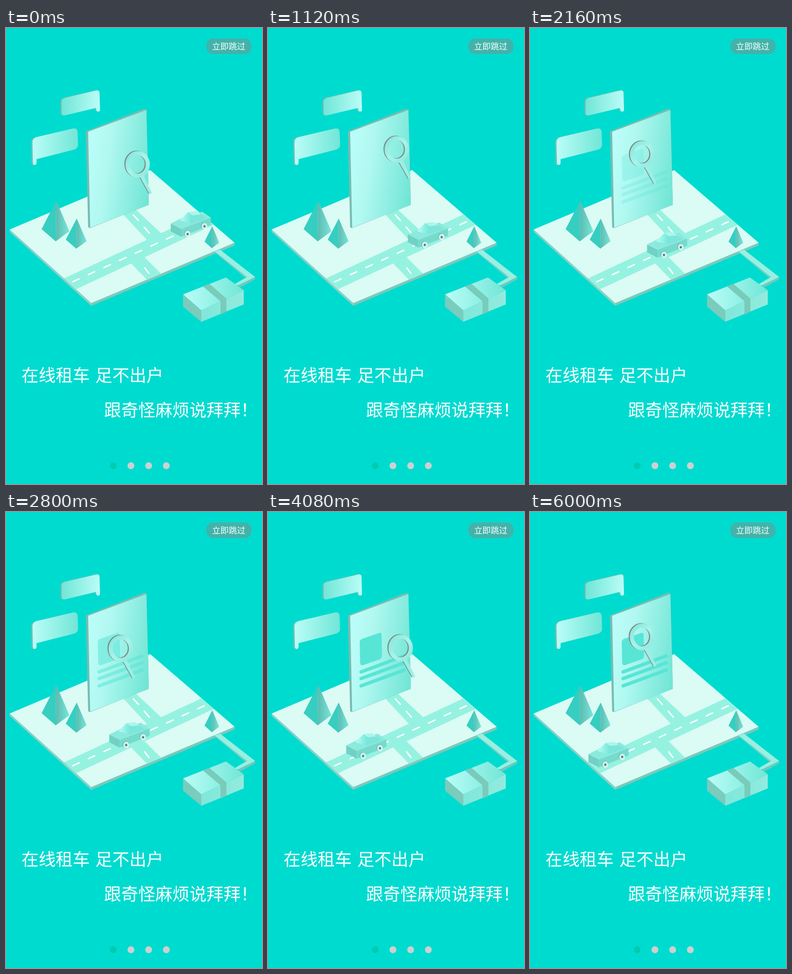
An HTML page for the animation above (6080 ms loop, 561x998 px).

```html
<!DOCTYPE html>
<html lang="zh-CN">
<head>
<meta charset="utf-8">
<title>在线租车</title>
<style>
  html, body { margin: 0; width: 100%; height: 100%; overflow: hidden; background: #00dbd0; }
  svg { display: block; width: 561px; height: 998px; }
  text { font-family: "Noto Sans CJK SC", "Noto Sans CJK", sans-serif; fill: #fff; }
  .title { font-size: 37.4px; font-weight: 300; }
  .road { fill: #96f2e0; }
  .dash { stroke: #fff; stroke-width: 3; stroke-linecap: round; }
  .edge { fill: #78bdb1; }
</style>
</head>
<body>
<svg viewBox="0 0 561 998">
  <defs>
    <linearGradient id="fall"><stop stop-color="#bafdf7"/><stop offset="1" stop-color="#70e6d7"/></linearGradient>
    <linearGradient id="rise"><stop stop-color="#70e6d7"/><stop offset="1" stop-color="#bafdf7"/></linearGradient>
    <linearGradient id="sheet" gradientUnits="userSpaceOnUse" x1="181" y1="300" x2="316" y2="318">
      <stop stop-color="#bafdf8"/><stop offset=".3" stop-color="#b0f8f0"/><stop offset="1" stop-color="#72e6d6"/>
    </linearGradient>
    <linearGradient id="slope"><stop stop-color="#5cbbb0"/><stop offset="1" stop-color="#78e6da"/></linearGradient>
    <linearGradient id="side"><stop stop-color="#7fe7da"/><stop offset="1" stop-color="#92ebde"/></linearGradient>
    <linearGradient id="rim" x1="0" y1="0" x2="1" y2="1"><stop stop-color="#86e6da"/><stop offset=".5" stop-color="#a8f4ea"/><stop offset="1" stop-color="#8ceadf"/></linearGradient>
    <path id="bubbleA" d="M122,162Q122,155 129,153L197,137Q205,135 205,143L206,179Q206,183 202,183Q198,183 198,179L197,175L130,191Q122,193 122,186Z"/>
    <path id="bubbleB" d="M58,250Q58,242 66,239L147,220Q157,218 157,229L158,255Q158,263 150,266L67,287L67,295Q67,299 63,300Q59,299 59,295Z"/>
    <g id="lens">
      <ellipse cx="288.5" cy="298.5" rx="22.3" ry="24.7" fill="none" stroke-width="9"/>
      <path d="M293,325L301,322L320,361L315,364Z" stroke="none"/>
    </g>
    <g id="wheel">
      <ellipse cx="-1.5" cy="-1" rx="6.5" ry="7.5" fill="#66c9bd"/>
      <ellipse rx="6" ry="7" fill="#dcf7f3"/>
      <ellipse rx="3.4" ry="4" fill="#b4d8d3"/>
      <circle r="2" fill="#3d6866"/>
    </g>
  </defs>

  <rect width="561" height="998" fill="#00dbd0"/>
  <rect x="439" y="23" width="99" height="34" rx="15" fill="#42b3aa"/>
  <text x="451.5" y="46.5" font-size="18.3">立即跳过</text>

  <!-- board and roads -->
  <path d="M8,441L187,602V608L8,446Z" fill="#90cfc3"/>
  <path d="M187,602L501,470V476L187,608Z" fill="#7fc8ba"/>
  <path d="M8,441L316,311L501,470L187,602Z" fill="#dbfbf5"/>
  <path class="road" d="M127,548L428,408L455,431L153,572Z"/>
  <path class="road" d="M255,406L283,396L343,452L309,464Z"/>
  <path class="road" d="M274,515L303,501L340,538L309,551Z"/>
  <path class="dash" d="M146,555.5L437,423" stroke-dasharray="15.5 22.2"/>
  <path class="dash" d="M279,409L290,421M303,436L314,449M304,525L313,537"/>

  <g id="trees"></g>

  <!-- parcel and its track -->
  <path d="M457,489L469,485L546,545L510,563L497,563L528,545Z" fill="#98efe2"/>
  <path d="M546,545V550L511,569L509,563Z" fill="#70c9bb"/>
  <path d="M457,489L528,545L525,547L460,493Z" fill="#7ccdc0"/>
  <path d="M388,583L482,546L521,574L428,618Z" fill="url(#fall)"/>
  <path d="M388,583L428,618V643L388,610Z" fill="#7accbd"/>
  <path d="M428,618L521,574V605L428,643Z" fill="url(#side)"/>
  <path d="M432,566L446,560L483,592V621L470,627V598Z" fill="#79cbba"/>

  <!-- speech bubbles -->
  <use href="#bubbleA" class="edge" x="-2.5" y="-.5"/>
  <use href="#bubbleA" fill="url(#rise)"/>
  <use href="#bubbleB" class="edge" x="-3" y=".5"/>
  <use href="#bubbleB" fill="url(#fall)"/>

  <!-- upright page -->
  <path class="edge" d="M175,226L303,176.5L308,179L313,387L184,438L180,436Z"/>
  <path d="M180,227L307.5,179.5L313,387L184.5,437Z" fill="url(#sheet)"/>
  <g id="content" fill="#58e5d6" stroke="#58e5d6">
    <path d="M201,286Q201,279 208,277L243,265Q249,263 249,270L250,314Q250,321 243,323L209,335Q202,337 202,330Z" stroke="none"/>
    <path d="M204,350L298.5,315M204,364.5L298.5,330M204,380.5L298.5,346" stroke-width="7.5" stroke-linecap="round"/>
  </g>

  <g id="car">
    <path d="M361,428L385,416L430,402L449,415V418L384,440Z" fill="#8ceadd"/>
    <path d="M361,428L384,440V457L361,445Z" fill="#70d1c4"/>
    <path d="M384,440L449,415V431L384,457Z" fill="#76dacd"/>
    <path d="M381,421L399,403L409,410L406,428Z" fill="url(#fall)"/>
    <path d="M406,428L409,410L427,408L440,416Z" fill="#7de5d9"/>
    <path d="M399,403L417,401L427,408L409,410Z" fill="#a9f6ed"/>
    <use href="#wheel" x="398" y="451"/>
    <use href="#wheel" x="435" y="434"/>
  </g>

  <g id="glass">
    <use href="#lens" x="-2.4" y="-1" fill="#808886" stroke="#808886"/>
    <use href="#lens" fill="#9befe4" stroke="url(#rim)"/>
  </g>

  <text class="title" x="34" y="774">在线租车<tspan x="195.5">足不出户</tspan></text>
  <text class="title" x="215" y="850">跟奇怪麻烦说拜拜！</text>
  <g id="dots"></g>
</svg>
<script>
const LOOP = 6080, MOVE = 6000, STEP = 40;
const $ = id => document.getElementById(id);

const tree = (x, y, w, h) =>
  `<path d="M${x},${y}l${-w},${h * .7}L${x - 1},${y + h}Z" fill="#36cec1"/>
   <path d="M${x},${y}L${x - 1},${y + h}L${x + w * .9},${y + h * .75}Z" fill="url(#slope)"/>`;
$('trees').innerHTML = tree(110, 378, 32, 89) + tree(155, 417, 24, 66) + tree(452, 434, 17, 48);

for (let i = 0; i < 4; i++)
  $('dots').innerHTML += `<circle cx="${235 + 38.8 * i}" cy="958" r="7.5" fill="${i ? '#cfd0d0' : '#00cbae'}"/>`;

// The glass passes one point of its looping path each second.
const path = [[0, 0], [-3, -31.5], [-41, -26], [-33, 5], [1, 1], [1, -35], [-43, -25]];

// Catmull-Rom curve with free ends; u counts points.
function along(points, u) {
  const last = points.length - 1, i = Math.min(last - 1, Math.floor(u)), s = u - i;
  const blend = s * s * (3 - 2 * s);
  return [0, 1].map(k => {
    const at = j => points[j][k];
    const slope = j => {
      const a = Math.max(0, j - 1), b = Math.min(last, j + 1);
      return (at(b) - at(a)) / (b - a);
    };
    return at(i) + (at(i + 1) - at(i)) * blend
      + s * (1 - s) * ((1 - s) * slope(i) - s * slope(i + 1));
  });
}

// steady speed that brakes towards the end
const brake = p => (5 * p - p ** 5) / 4;
const move = (id, [x, y]) => $(id).setAttribute('transform', `translate(${x} ${y})`);
const start = performance.now();

function draw() {
  const elapsed = (performance.now() - start) % LOOP;
  const t = Math.min(MOVE, Math.floor(elapsed / STEP) * STEP);
  const p = brake(t / MOVE);
  move('car', [-233 * p, 102 * p]);
  move('glass', along(path, t / 1000));
  $('content').setAttribute('opacity', Math.max(0, Math.min(1, (t - 1500) / 2500)));
  requestAnimationFrame(draw);
}
draw();
</script>
</body>
</html>
```
